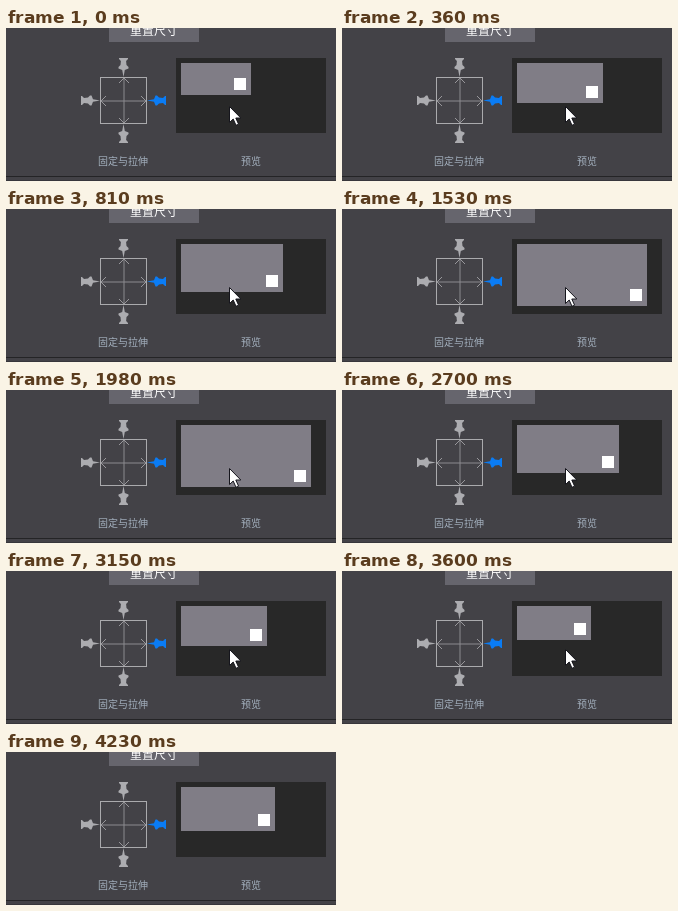
Recreate the animation shown at these times as an HTML page. Size 330 by 153 pixels, loop 4310 ms.

```html
<!DOCTYPE html>
<html lang="zh-CN">
<head>
<meta charset="utf-8">
<title>固定与拉伸</title>
<style>
html, body { margin: 0; width: 100%; height: 100%; overflow: hidden; background: #434247; }
svg { display: block; position: absolute; left: 0; top: 0; }
text { font-family: "Noto Sans CJK SC", "Noto Sans CJK", "Noto Sans", sans-serif; text-anchor: middle; }
.label { font-size: 10px; fill: #a3b0be; }
.pin { fill: #acacb0; }
.pin.on { fill: #0a7cf5; }
</style>
</head>
<body>
<svg width="330" height="153" viewBox="0 0 330 153">
  <defs>
    <path id="pin" d="M0 0L-1.3 -7L-5 -8.5V-10L-3 -12L-2.6 -16L-4.5 -18V-19H4.5V-18L2.6 -16L3 -12L5 -10V-8.5L1.3 -7Z"/>
    <path id="chevron" d="M-5 5.5L0 .5L5 5.5"/>
  </defs>
  <rect width="330" height="153" fill="#434247"/>
  <rect y="148" width="330" height="1" fill="#242426"/>
  <rect y="152" width="330" height="1" fill="#37363b"/>

  <rect x="103" width="90" height="14" fill="#66656d"/>
  <text x="148" y="7" font-size="12" fill="#fff">重置尺寸</text>

  <g fill="none" stroke="#8b8a8f">
    <path d="M118 50V95M95 73H140"/>
    <g stroke="#98979b">
      <use href="#chevron" transform="translate(118 49.5)"/>
      <use href="#chevron" transform="translate(140.5 73) rotate(90)"/>
      <use href="#chevron" transform="translate(118 95.5) rotate(180)"/>
      <use href="#chevron" transform="translate(94.5 73) rotate(-90)"/>
    </g>
    <rect x="94.5" y="49.5" width="46" height="46" stroke="#aaaaad"/>
  </g>
  <use class="pin" href="#pin" transform="translate(117.5 49)"/>
  <use class="pin on" href="#pin" transform="translate(141 72.5) rotate(90)"/>
  <use class="pin" href="#pin" transform="translate(117.5 96) rotate(180)"/>
  <use class="pin" href="#pin" transform="translate(94 72.5) rotate(-90)"/>

  <rect x="170" y="30" width="150" height="75" fill="#282828"/>
  <rect id="panel" x="175" y="35" width="70" height="32" fill="#807d86"/>
  <rect id="knob" x="228" y="50" width="12" height="12" fill="#fff"/>

  <text class="label" x="117" y="137">固定与拉伸</text>
  <text class="label" x="245" y="137">预览</text>

  <path id="cursor" d="M.5 .5V16.5L4.2 13L7 19.3L9.6 18.2L6.8 12H11.8Z" fill="#fff" stroke="#15151c"/>
</svg>
<script>
const LOOP = 4310, STEP = 90;
const [panel, knob, cursor] = ['panel', 'knob', 'cursor'].map(id => document.getElementById(id));

// The panel grows or shrinks one level per step, resting at these steps.
const rests = new Set([0, 6, 12, 20, 27, 33, 41, 47]);
const levels = [];
for (let s = 0, level = 0; s * STEP < LOOP; s++) {
  if (!rests.has(s)) level += s > 20 && s < 40 ? -1 : 1;
  levels.push(level);
}

// Cursor: [first step, x, y]; it leaves through the bottom edge.
const path = [[0, 223, 78], [45, 236, 95], [46, 269, 137], [47, 290, 170]];

function draw(now) {
  const s = Math.floor((now % LOOP) / STEP);
  const w = 70 + 4 * levels[s], h = 32 + 2 * levels[s];
  panel.setAttribute('width', w);
  panel.setAttribute('height', h);
  knob.setAttribute('x', 175 + w - 17);
  knob.setAttribute('y', 35 + h - 17);
  const [, x, y] = path.filter(p => p[0] <= s).pop();
  cursor.setAttribute('transform', `translate(${x} ${y})`);
}

let start;
function tick(now) {
  start ??= now;
  draw(now - start);
  requestAnimationFrame(tick);
}
draw(0);
requestAnimationFrame(tick);
</script>
</body>
</html>
```
